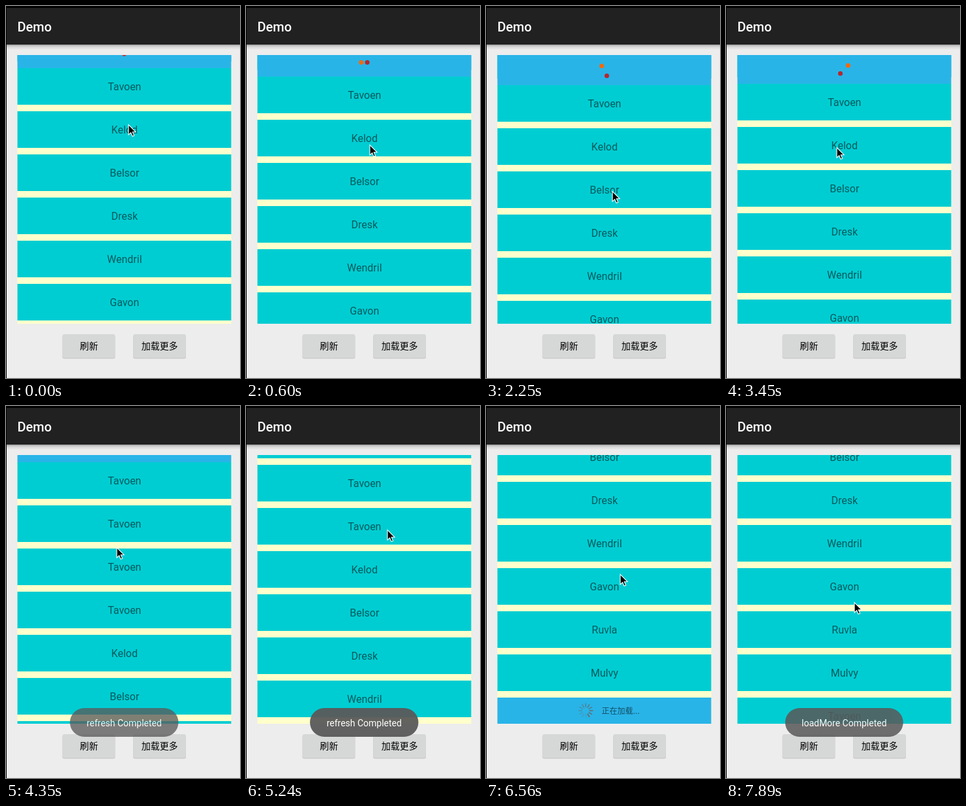
An HTML page that plays this animation: 359x569 px, repeating every 8000 ms.

```html
<!DOCTYPE html>
<html lang="zh">
<head>
<meta charset="utf-8">
<title>Demo</title>
<style>
  html, body { margin: 0; width: 100%; height: 100%; overflow: hidden; background: #ededed; }
  svg { display: block; font-family: Roboto, sans-serif; }
  .mid { text-anchor: middle; }
  .row rect { fill: #00cdd2; }
  .row text { font-size: 16px; fill: rgba(0, 0, 0, .56); }
  .cjk { font-family: "Noto Sans CJK SC", "Noto Sans CJK", sans-serif; }
  .button rect { fill: #d6d7d7; }
  .button text { font-size: 14px; font-weight: 500; fill: #000; }
  .button .edge { fill: #000; opacity: .14; }
  .blue { fill: #29b4e8; }
  #toast rect { fill: #5a5a5a; fill-opacity: .95; }
  #toast text { font-size: 14px; fill: #fff; }
</style>
</head>
<body>
<svg width="359" height="569" viewBox="0 0 359 569">
  <defs>
    <clipPath id="view"><rect x="17.5" y="75" width="328" height="411"/></clipPath>
    <linearGradient id="shade" x2="0" y2="1">
      <stop offset="0" stop-opacity=".32"/>
      <stop offset=".4" stop-opacity=".1"/>
      <stop offset="1" stop-opacity="0"/>
    </linearGradient>
  </defs>
  <rect width="359" height="569" fill="#ededed"/>
  <rect y="59" width="359" height="8" fill="url(#shade)"/>
  <rect y="3" width="359" height="56" fill="#212121"/>
  <rect width="359" height="3"/>
  <rect width="1" height="569"/>
  <text x="17.5" y="39" font-size="20" font-weight="500" fill="#fff">Demo</text>

  <g clip-path="url(#view)">
    <rect x="17" y="75" width="329" height="411" fill="#ffffcc"/>
    <g id="list">
      <g id="footer">
        <rect class="blue" x="17" y="726" width="329" height="40"/>
        <g id="spinner" transform="translate(153 746)"></g>
        <text class="cjk" x="177.5" y="750.5" font-size="12" fill="#000" fill-opacity=".56">正在加载...</text>
      </g>
    </g>
    <rect id="header" class="blue" x="17" y="75" width="329"/>
    <circle id="orange" r="3.5" fill="#f26a0c"/>
    <circle id="red" r="3.5" fill="#b5272d"/>
  </g>

  <g id="buttons"></g>
  <g id="toast">
    <rect y="462" height="44" rx="22"/>
    <text class="mid" x="181.3" y="490"></text>
  </g>
  <path id="cursor" d="M0 0V15.5L3.6 12.2L6 17.8L8.6 16.7L6.2 11.2H11Z" stroke="#fff" stroke-width="1.1"/>
</svg>
<script>
const $ = id => document.getElementById(id);
const PERIOD = 8000, TOP = 75, PITCH = 66;
const RELEASED = 2000, REFRESHED = 4150, LOADED = 7560;
const names = ['Tavoen', 'Tavoen', 'Tavoen', 'Tavoen', 'Kelod', 'Belsor',
  'Dresk', 'Wendril', 'Gavon', 'Ruvla', 'Mulvy', 'Tavoen'];

// progress from 0 to 1 between two times: steady, slowing down, smooth
const steady = (t, from, to) => Math.max(0, Math.min(1, (t - from) / (to - from)));
const settle = (t, from) => 1 - (1 - steady(t, from, from + 400)) ** 2;
const smooth = (t, from, to) => (1 - Math.cos(Math.PI * steady(t, from, to))) / 2;
const move = (el, x, y) => el.setAttribute('transform', `translate(${x} ${y})`);

function pose(t) {
  const pullDown = steady(t, 0, 1950);
  const scroll = 164 * steady(t, 4850, 5400);
  const fling = 76 * settle(t, 5400);
  const pullUp = 115 * steady(t, 5900, 6420);
  // free pointer moves between the drags
  const back = smooth(t, 2300, 3000), reach = smooth(t, 4550, 4850);
  const again = smooth(t, 5450, 5900), leave = smooth(t, 7600, 7880);
  return {
    offset: Math.round(20 + 42 * pullDown - 18 * settle(t, RELEASED)
      - 44 * settle(t, REFRESHED) - scroll - fling - pullUp),
    x: 188 + 6 * pullDown - 24 * back + 47 * reach - 11 * again - 9 * leave,
    y: 181 + 102 * pullDown - 67 * back + 90 * reach - scroll
      + 230 * again - pullUp + 43 * leave
  };
}

$('list').insertAdjacentHTML('afterbegin', names.map((name, i) =>
  `<g class="row" transform="translate(17 ${i * PITCH})"><rect width="329" height="56"/>
   <text class="mid" x="164.8" y="34">${name}</text></g>`).join(''));
const lastRow = $('footer').previousElementSibling;

$('spinner').innerHTML = names.map((_, i) =>
  `<path d="M0 -6V-10.5" stroke="#666" stroke-width="2" stroke-linecap="round"
   opacity="${.15 + i * .06}"/>`).join('');
const spokes = [...$('spinner').children];

$('buttons').innerHTML = [[87, '刷新'], [195.5, '加载更多']].map(([x, label]) =>
  `<g class="button" transform="translate(${x} 502)">
   <rect class="edge" x="-.5" y="1" width="81" height="36.5" rx="2.5"/>
   <rect width="80" height="36" rx="2"/>
   <text class="mid cjk" x="40.2" y="23">${label}</text></g>`).join('');

function drawDots(t, pull) {
  const spin = Math.max(0, t - RELEASED - 78) / 1000 * 2 * Math.PI;
  const gap = 8.5 * steady(pull, 22, 42);
  const dx = gap * Math.cos(spin), dy = gap * Math.sin(spin);
  const y = TOP + pull - 21.8;
  move($('orange'), 181.4 - dx, y - dy);
  move($('red'), 181.4 + dx, y + dy);
}

function drawToast(t) {
  const late = t > 7000;
  const half = late ? 90.5 : 83.2;
  const [box, label] = $('toast').children;
  box.setAttribute('x', 181.3 - half);
  box.setAttribute('width', half * 2);
  label.textContent = late ? 'loadMore Completed' : 'refresh Completed';
  $('toast').setAttribute('opacity', late
    ? steady(t, 7590, 7920)
    : steady(t, 4140, 4400) - steady(t, 6150, 6400));
}

function draw(t) {
  const { offset, x, y } = pose(t);
  const loaded = t >= LOADED;
  // three rows are added on top by the refresh
  move($('list'), 0, TOP + offset - (t < REFRESHED ? 3 * PITCH : 0));
  $('header').setAttribute('height', Math.max(0, offset));
  lastRow.setAttribute('visibility', loaded ? 'visible' : 'hidden');
  $('footer').setAttribute('visibility', loaded ? 'hidden' : 'visible');
  const step = Math.floor(t / 1000 * 12);
  spokes.forEach((s, i) => s.setAttribute('transform', `rotate(${(i + step) % 12 * 30})`));
  drawDots(t, offset);
  drawToast(t);
  move($('cursor'), Math.round(x), Math.round(y) + .5);
}

function frame() {
  draw(performance.now() % PERIOD);
  requestAnimationFrame(frame);
}
frame();
</script>
</body>
</html>
```
